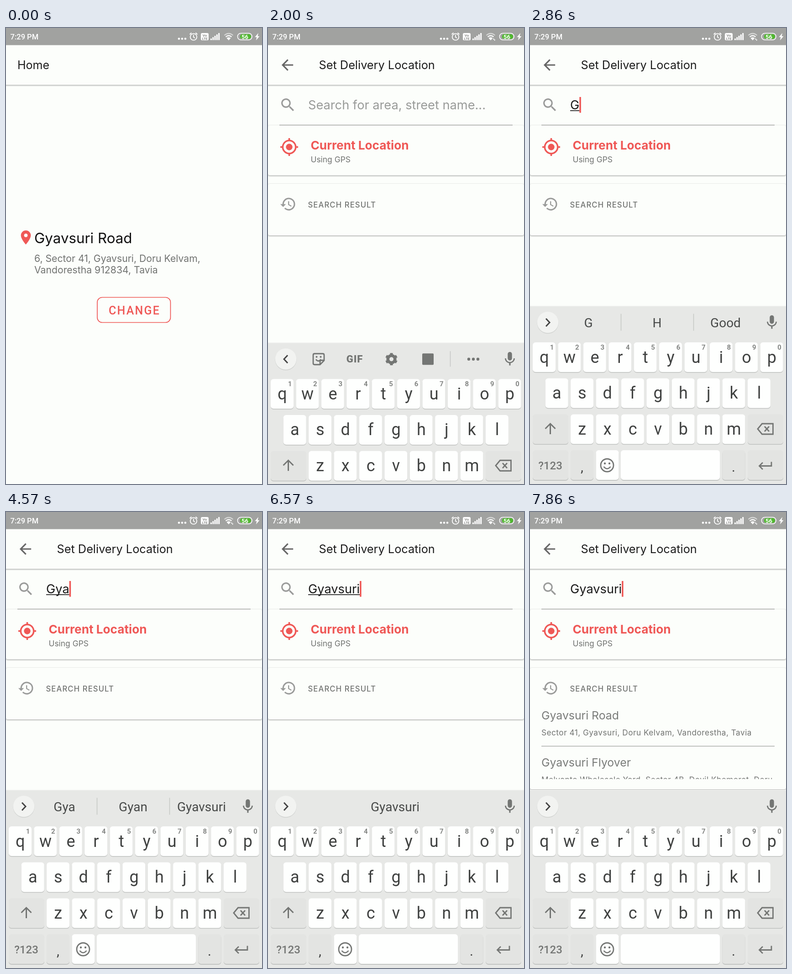
An HTML page for the animation above (8 s loop, 561 px wide and 998 px high).

```html
<!DOCTYPE html>
<html lang="en">
<head>
<meta charset="utf-8">
<title>Set delivery location</title>
<style>
html, body { margin: 0; width: 100%; height: 100%; overflow: hidden; background: #fcfefb; }
svg { display: block; width: 100vw; height: 100vh; }
text { font-family: Inter, sans-serif; white-space: pre; }
.roboto, .roboto text { font-family: Roboto, sans-serif; }
.mid { text-anchor: middle; }
.line { fill: none; }
.raised { fill: #fcfefb; filter: drop-shadow(0 1.8px 1.5px rgba(0, 0, 0, .42)); }
.caps .letter { text-transform: uppercase; }
</style>
</head>
<body>
<svg id="stage" viewBox="0 0 561 998"></svg>
<script>
const LOOP = 8000, RED = '#ef5856', PAPER = '#fcfefb', GREY = '#717371', INK = '#1c1c1c';
const KEY_INK = '#404241', SPECIAL_KEY = '#e3e4e2';
const PLACE = 'Gyavsuri';

// Drawing helpers
const text = (x, y, size, str, fill = INK, extra = '') =>
  `<text x="${x}" y="${y}" font-size="${size}" fill="${fill}" ${extra}>${str}</text>`;
const rect = (x, y, w, h, r, fill, extra = '') =>
  `<rect x="${x}" y="${y}" width="${w}" height="${h}" rx="${r}" fill="${fill}" ${extra}/>`;
const circle = (x, y, r, fill, extra = '') => `<circle cx="${x}" cy="${y}" r="${r}" fill="${fill}" ${extra}/>`;
const stroke = (d, color, width, extra = '') =>
  `<path class="line" d="${d}" stroke="${color}" stroke-width="${width}" ${extra}/>`;
const icon = (d, x, y, scale, fill) =>
  `<path transform="translate(${x} ${y}) scale(${scale}) translate(-12 -12)" d="${d}" fill="${fill}"/>`;
const dots = (x, y, gap, r, fill) => [-1, 0, 1].map(i => circle(x + i * gap, y, r, fill)).join('');

const ICONS = {
  back: 'M20 11H7.83l5.59-5.59L12 4l-8 8 8 8 1.41-1.41L7.83 13H20z',
  search: 'M15.5 14h-.79l-.28-.27A6.5 6.5 0 1 0 13.73 14.43l.27.28v.79l5 4.99L20.49 19zm-6 0a4.5 4.5 0 1 1 0-9 4.5 4.5 0 0 1 0 9z',
  history: 'M13 3a9 9 0 0 0-9 9H1l3.89 3.89.07.14L9 12H6a7 7 0 1 1 2.06 4.94l-1.42 1.42A9 9 0 1 0 13 3zm-1 5v5l4.28 2.54.72-1.21-3.5-2.08V8z',
  pin: 'M12 2a7 7 0 0 0-7 7c0 5.25 7 13 7 13s7-7.75 7-13a7 7 0 0 0-7-7zm0 9.5a2.5 2.5 0 1 1 0-5 2.5 2.5 0 0 1 0 5z',
  mic: 'M12 14a3 3 0 0 0 3-3V5a3 3 0 0 0-6 0v6a3 3 0 0 0 3 3zm5.3-3a5.3 5.1 0 0 1-10.6 0H5c0 3.41 2.72 6.23 6 6.72V21h2v-3.28c3.28-.48 6-3.3 6-6.72z'
};

function statusBar() {
  const bars = [0, 1, 2, 3, 4].map(i => rect(448 + i * 4.3, 23 - i * 3, 3, 3.5 + i * 3, .5, '#fff')).join('');
  return `<g class="roboto">${rect(0, 0, 561, 37.5, 0, '#a1a2a0')}
    ${text(9.5, 25, 16.5, '7:29 PM', '#fff', 'font-weight="500"')}
    ${dots(386, 23.5, 7, 2.3, '#fff')}
    ${circle(411, 19.5, 7.2, 'none', 'stroke="#fff" stroke-width="1.8"')}
    ${stroke('M411 15v5l3 2M402.5 14l4-3.5M419.5 14l-4-3.5', '#fff', 1.8)}
    ${rect(427, 11, 17, 16, 3, '#fff')}
    ${text(435.5, 18.5, 8, 'Vo', '#8d8e8c', 'class="mid" font-weight="700"')}
    ${text(435.5, 25.5, 7.5, 'LTE', '#8d8e8c', 'class="mid" font-weight="700"')}
    ${bars}
    ${stroke('M478.5 16q9.5-8 19 0', '#fff', 2.2, 'opacity=".55"')}
    ${stroke('M481.5 19.5q6.5-5.5 13 0', '#fff', 2.2)}
    <path d="M483.5 22q4.5-3.5 9 0l-4.5 5z" fill="#fff"/>
    <path id="traffic" d="M492.5 25l2-2.5 2 2.5zM494.5 25.5h4l-2 2.5z" fill="#fff"/>
    ${rect(507.5, 11.5, 31.5, 14.5, 7, 'none', 'stroke="#fff" stroke-width="1.6"')}
    ${rect(513, 13.5, 24, 10.5, 5, '#4fb82e')}
    ${text(523.5, 23.5, 13, '56', '#fff', 'class="mid" font-weight="700"')}
    <path d="M553 11l-7.5 9h4l-1.5 7 7.5-9h-4z" fill="#fff"/></g>`;
}

const appBar = `<rect class="raised" x="-4" y="30" width="569" height="94.5"/>`;

function homePage() {
  return `<g id="home">${rect(0, 0, 561, 998, 0, PAPER)}${appBar}
    ${text(25, 90, 25, 'Home')}
    ${icon(ICONS.pin, 43.5, 458.5, 1.55, RED)}
    ${text(62, 470.5, 31.3, PLACE + ' Road', '#111')}
    ${text(62, 512, 21.2, `6, Sector 41, ${PLACE}, Doru Kelvam,`, GREY)}
    ${text(62, 537, 21.2, 'Vandorestha 912834, Tavia', GREY)}
    ${rect(200, 589.5, 160.5, 55, 11, RED, 'id="ripple"')}
    ${rect(200, 589.5, 160.5, 55, 11, 'none', `stroke="${RED}" stroke-width="1.7"`)}
    ${text(225, 626.5, 25, 'CHANGE', RED, 'class="roboto" font-weight="500" letter-spacing="2.2"')}</g>`;
}

function searchPage() {
  const result = (y, title, address) =>
    text(25, y, 24.8, title, '#7a7c7a') + text(25, y + 35, 17.2, address, GREY, 'letter-spacing=".5"');
  return `<g id="search">${rect(0, 0, 561, 998, 0, PAPER)}${appBar}
    ${icon(ICONS.back, 42.5, 81, 1.58, '#666')}
    ${text(111.5, 90, 25.3, 'Set Delivery Location')}
    ${icon(ICONS.search, 43.4, 168.4, 1.6, '#9a9b9a')}
    <rect class="raised" y="213" width="561" height="109.5" rx="4"/>
    <rect id="card" class="raised" y="341" width="561" rx="4"/>
    ${stroke('M25 212.5H536', '#a3a4a3', 1.4)}
    ${text(88, 178, 27.2, 'Search for area, street name...', '#999b99', 'id="hint"')}
    ${text(88, 178, 27.2, '', INK, 'id="typed"')}
    ${rect(88, 180, 0, 1.7, 0, INK, 'id="underline"')}
    ${rect(88, 151, 3.5, 34.5, 0, RED, 'id="cursor"')}
    ${circle(46.5, 260.5, 7.2, RED)}
    ${circle(46.5, 260.5, 14.2, 'none', `stroke="${RED}" stroke-width="3.5"`)}
    ${stroke('M46.5 241v5m0 29v5M27 260.5h5m29 0h5', RED, 3.5)}
    ${text(93.5, 266, 26.2, 'Current Location', RED, 'font-weight="700"')}
    ${text(93.5, 294, 17.4, 'Using GPS', GREY)}
    ${icon(ICONS.history, 44, 385.5, 1.55, '#9a9b9a')}
    ${text(87.5, 393, 16.6, 'SEARCH RESULT', GREY, 'font-weight="500" letter-spacing="1.15"')}
    <clipPath id="list"><rect y="410" width="561" height="174.5"/></clipPath>
    <g id="results" clip-path="url(#list)">
      ${result(453.5, PLACE + ' Road', `Sector 41, ${PLACE}, Doru Kelvam, Vandorestha, Tavia`)}
      ${stroke('M25 512.5H536', '#a9aaa9', 1.4)}
      ${result(556.5, PLACE + ' Flyover', 'Melvanto Wholesale Yard, Sector 4B, Dovil Khemorat, Doru')}
    </g></g>`;
}

const KEY_W = 50, KEY_H = 65, PITCH = 55.4, rowTop = r => 688 + r * 78.7;
const ROWS = [['qwertyuiop', 6], ['asdfghjkl', 33.7], ['zxcvbnm', 89.1]];
const keyBox = (x, row, w, fill, id = '') =>
  rect(x, rowTop(row) + 1.6, w, KEY_H, 6, '#bfc1bf') + rect(x, rowTop(row), w, KEY_H, 6, fill, id);

function keyPosition(letter) {
  const row = ROWS.findIndex(([letters]) => letters.includes(letter));
  return { row, x: ROWS[row][1] + ROWS[row][0].indexOf(letter) * PITCH };
}

function keyboard() {
  const icons = '#747674';
  const letters = ROWS.map(([keys]) => [...keys].map((letter, i) => {
    const { row, x } = keyPosition(letter);
    const digit = row ? '' : text(x + 42, 704, 15, (i + 1) % 10, '#858785', 'class="mid" font-weight="700"');
    return keyBox(x, row, KEY_W, '#fefffe') +
      text(x + 25.2, rowTop(row) + 44.5, 36, letter, KEY_INK, 'class="letter mid"') + digit;
  }).join('')).join('');
  const toolbar = `<g id="toolbar">
    ${stroke('M43 636l-8 8.5 8 8.5', '#444', 3)}
    ${stroke('M102 632.5h18q3 0 3 3v12l-9 9h-12q-3 0-3-3v-18q0-3 3-3zM123 647h-6q-3 0-3 3v6M105 645q5 7 11 0', icons, 2.8)}
    ${circle(106.5, 639.5, 2, icons)}${circle(115.5, 639.5, 2, icons)}
    ${text(190, 652, 22, 'GIF', icons, 'class="mid" font-weight="900" letter-spacing="1"')}
    ${circle(270.5, 644.5, 7.8, 'none', `stroke="${icons}" stroke-width="6.5"`)}
    ${circle(270.5, 644.5, 11.5, 'none', `stroke="${icons}" stroke-width="4" pathLength="12" stroke-dasharray="1" transform="rotate(15 270.5 644.5)"`)}
    ${rect(338, 632, 25, 25, 2, icons)}
    ${stroke('M399.5 627v34', '#c4c6c4', 1.5)}${dots(450, 644.5, 10, 3.2, icons)}</g>`;
  const words = [128, 278.5, 428.5].map((x, i) => text(x, 654.5, 28, '', '#484a49', `class="mid" id="word${i}"`)).join('');
  return `<g id="keyboard" class="roboto">
    ${rect(0, 608, 561, 3, 0, '#f1f2f0')}${rect(0, 609.5, 561, 400, 0, '#e7e8e6')}
    ${circle(39, 645.5, 23.5, '#cfd1cf')}${circle(39, 644.3, 23.3, '#f2f3f1')}
    ${toolbar}
    <g id="strip">${stroke('M35 636l8 8.5-8 8.5', '#444', 3)}${words}
      ${stroke('M199.5 625.5v37M358.5 625.5v37', '#c4c6c4', 1.5, 'id="dividers"')}</g>
    ${icon(ICONS.mic, 530, 644.3, 1.56, icons)}
    ${letters}
    ${keyBox(6, 2, 78, SPECIAL_KEY, 'id="shift"')}${stroke('M44.5 889v-23m-11 11l11-11 11 11', icons, 3)}
    ${keyBox(477, 2, 78, SPECIAL_KEY)}${stroke('M499 877.5l9.5-11.5H532.5v23H508.5zM514 872l10 11m0-11l-10 11', icons, 2.8)}
    ${keyBox(6, 3, 78, SPECIAL_KEY)}${text(44.5, 966, 24, '?123', icons, 'class="mid" font-weight="500"')}
    ${keyBox(89, 3, KEY_W, SPECIAL_KEY)}${text(114, 971, 30, ',', KEY_INK, 'class="mid"')}
    ${keyBox(144.5, 3, KEY_W, '#fefffe')}${circle(169, 957, 14, 'none', `stroke="${icons}" stroke-width="2.8"`)}
    ${circle(164, 953, 2.2, icons)}${circle(174, 953, 2.2, icons)}${stroke('M161.5 960q7.5 9 15 0', icons, 2.5)}
    ${keyBox(199, 3, 217, '#fefffe')}
    ${keyBox(421.5, 3, KEY_W, SPECIAL_KEY)}${text(446, 971, 30, '.', KEY_INK, 'class="mid"')}
    ${keyBox(477, 3, 78, SPECIAL_KEY)}${stroke('M529 949.5v9h-26m7-7.5l-7.5 7.5 7.5 7.5', icons, 2.8)}
    <g id="popup"><rect width="59" height="176" rx="6" fill="#fefffe" style="filter:drop-shadow(0 2px 2px rgba(0,0,0,.35))"/>
      ${text(30, 60, 44, '', KEY_INK, 'class="mid" id="popupLetter"')}${dots(45, 77.5, 5, 1.4, KEY_INK)}</g></g>`;
}

const stage = document.getElementById('stage');
stage.innerHTML = homePage() + searchPage() + statusBar() + keyboard();
const ui = {};
stage.querySelectorAll('[id]').forEach(el => ui[el.id] = el);

// Story: [time, letters typed so far, suggestions]
const EDITS = [
  [1480, 0, []],
  [2640, 1, ['G', 'H', 'Good']],
  [3200, 2, ['Gy', 'Gym', 'Gypsum']],
  [3500, 3, ['Gya', 'Gyan', PLACE]],
  [5520, 4, ['Gyav', PLACE, 'Gyam']],
  [6080, 5, ['Gyavs', PLACE, 'Gyavi']],
  [6380, 6, ['Gyavsu', PLACE, 'Gyavi']],
  [6480, 7, ['', PLACE, '']],
  [6560, 8, ['', PLACE, '']]
];
const PRESSES = [['g', 2480, 2640], ['y', 3050, 3200], ['a', 3400, 3600], ['s', 5850, 6100], ['u', 6250, 6380]];
const COMMIT = 7640;

const progress = (t, from, to) => Math.min(1, Math.max(0, (t - from) / (to - from)));
const easeOut = (p, power) => 1 - (1 - p) ** power;
const easeInOut = p => (1 - Math.cos(Math.PI * p)) / 2;
const show = (el, on) => el.style.display = on ? '' : 'none';
const shift = (el, x, y) => el.setAttribute('transform', `translate(${x} ${y})`);

function drawTyping(t) {
  const [since, count, words] = EDITS.findLast(([time]) => t >= time) || EDITS[0];
  const committed = t >= COMMIT;
  ui.typed.textContent = PLACE.slice(0, count);
  const width = count ? ui.typed.getComputedTextLength() : 0;
  ui.underline.setAttribute('width', committed ? 0 : width);
  ui.cursor.setAttribute('x', 88 + width);
  show(ui.cursor, t >= since && (t - since) % 1000 < 500);
  show(ui.hint, !count);
  show(ui.toolbar, !count);
  show(ui.strip, count);
  show(ui.dividers, words[0] && !committed);
  for (let i = 0; i < 3; i++) ui['word' + i].textContent = committed ? '' : words[i] || '';
}

function drawKeyboard(t) {
  const p = progress(t, 1860, 2150);
  show(ui.keyboard, p > 0);
  shift(ui.keyboard, 0, 389 * (1 - easeOut(p, 2.37)));
  const caps = t >= 2220 && t < 2640;
  ui.keyboard.classList.toggle('caps', caps);
  ui.shift.setAttribute('fill', caps ? '#cdcfcd' : SPECIAL_KEY);
  const press = PRESSES.find(([, from, to]) => t >= from && t < to);
  show(ui.popup, press);
  if (!press) return;
  const { row, x } = keyPosition(press[0]);
  shift(ui.popup, x - 4.9, rowTop(row) - 111);
  ui.popupLetter.textContent = caps ? press[0].toUpperCase() : press[0];
}

function draw(t) {
  const slide = easeOut(progress(t, 1380, 1740), 3);
  shift(ui.home, -140 * slide, 0);
  shift(ui.search, 561 * (1 - slide), 0);
  show(ui.search, slide > 0);
  ui.ripple.setAttribute('opacity', .16 * progress(t, 1080, 1250));
  show(ui.traffic, t > 430);
  ui.card.setAttribute('height', 113 + 153 * easeInOut(progress(t, 6740, 7040)));
  ui.results.setAttribute('opacity', easeInOut(progress(t, 7040, 7340)));
  drawTyping(t);
  drawKeyboard(t);
}

const start = performance.now();
function tick() {
  draw((performance.now() - start) % LOOP);
  requestAnimationFrame(tick);
}
tick();
</script>
</body>
</html>
```
